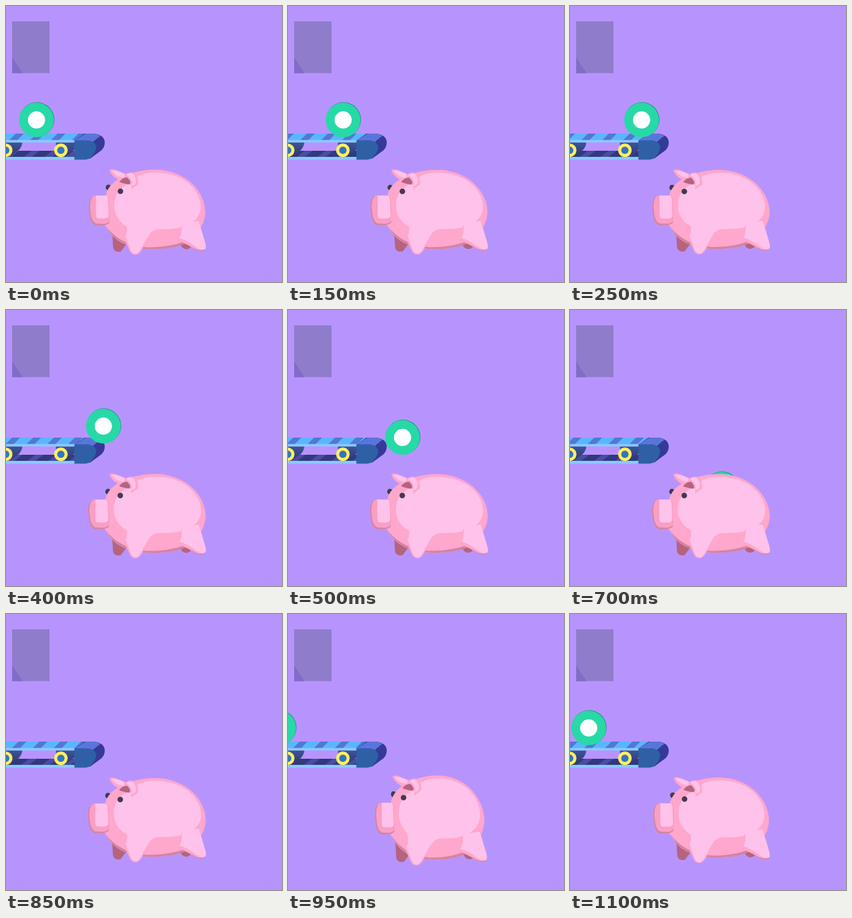
Write an HTML page that moves like this. It is 450 px wide and 450 px high and loops after 1150 ms.

```html
<!DOCTYPE html>
<html lang="en">
<head>
<meta charset="utf-8">
<title>Piggy bank</title>
<style>
  html, body { margin: 0; width: 100%; height: 100%; overflow: hidden; background: #b794fd; }
  svg { display: block; width: 100vw; height: 100vh; }
  .light { fill: #ffc2ea; }
  .mid { fill: #ffa7cd; }
  .shade { fill: #d6839f; }
  .dark { fill: #b5647f; }
  .eye { fill: #423b4c; }
</style>
</head>
<body>
<svg viewBox="0 0 450 450">
  <defs>
    <clipPath id="topFace"><path d="M0 208H134L112 219H0z"/></clipPath>
    <clipPath id="lowFace"><path d="M0 236H112V246H0z"/></clipPath>
    <linearGradient id="tube" x1="0" y1="0" x2="0" y2="1">
      <stop offset="0" stop-color="#3d5596"/>
      <stop offset="1" stop-color="#2f3878"/>
    </linearGradient>
    <g id="roller">
      <path d="M-8 -13H27Q27 -7 22 -1L8 9H-8z" fill="url(#tube)"/>
      <circle r="11" fill="#fff05e"/>
      <circle r="6" fill="#3574bd"/>
    </g>
  </defs>

  <rect width="450" height="450" fill="#b794fd"/>
  <rect x="10" y="25" width="61" height="84.500" fill="#8f7ccb"/>
  <path d="M10 84L27 109.500H10z" fill="#816cc8"/>

  <g id="belt">
    <g clip-path="url(#lowFace)">
      <rect y="236" width="112" height="10" fill="#303a7c"/>
      <g id="lowStripes" fill="#4a4da0"></g>
    </g>
    <g clip-path="url(#topFace)">
      <rect y="208" width="140" height="11" fill="#5bb5fd"/>
      <g id="topStripes" fill="#5377d5"></g>
    </g>
    <path d="M128 208H144Q160 210 161 222Q161 230 156 235L137 249L112 219z" fill="#343a97"/>
    <path d="M130 208H144Q150 209 154 211.500L141 222Q136 219 130 219H112z" fill="#5a75d9"/>
    <use href="#roller" x="-.5" y="235.200"/>
    <use href="#roller" x="89.500" y="235.200"/>
    <path d="M0 218.500H112V222.500H0zM0 246H112V250.500H0z" fill="#8ac9ff"/>
    <path d="M111.500 219H132Q147 220 147 231Q146 240 136 249L130 250.500H111.500z" fill="#2f60a6"/>
  </g>

  <g id="coin">
    <circle cx=".7" cy="-.6" r="28.400" fill="#238f87"/>
    <circle r="28.300" fill="#27d9a6"/>
    <circle r="14" fill="#fff"/>
  </g>

  <g id="farLegs" class="dark">
    <path d="M173 368L174.500 394Q177 402 187 400L199 384V368z"/>
    <path d="M276 378L288 394Q295 398.500 301 393L300 376z"/>
  </g>

  <g id="torso">
    <circle class="eye" cx="166.500" cy="296" r="4.500"/>
    <path class="mid" d="M161 318C161 299 173 287 188 280C205 271 228 266 250 267.500C296 271 326 304 325.500 338C324 355 314 370 302 381C285 393 258 397 230 396C204 394 184 387 172 373L160 356z"/>
    <path class="shade" d="M160 354C173 376 196 390 230 393C258 393 284 389 302 378V381C288 393 258 397 230 396C204 394 184 387 172 373z"/>
    <path class="light" d="M176 324C177 304 189 292 209 287C210 276 228 271 249 272C292 274 318 301 318 328C317 344 308 353 290 359C274 365 258 363 246 364Q238 365 232 374L197 360C184 352 175 339 176 324z"/>
    <path class="shade" d="M144 309H162Q166 309.500 167 315L168 353Q164 357 158 357L145 357.500Q138 354 136 344Q133 326 135 318Q138 310 144 309z"/>
    <path fill="#f89fc3" d="M144 309H162Q166 309.500 167 315L168 351Q164 355 158 355L146 354.500Q140 352 138 343Q135 326 137 318Q139 310 144 309z"/>
    <path class="light" d="M146 309H162Q165 309 166 315L167 342Q166 346 161 346.500H150Q146 346 146 341z"/>
  </g>

  <g id="face">
    <path class="mid" d="M168.300 268Q172 265.500 179 267.500L197 275L189 285Q174 282 168.300 268z"/>
    <path class="light" d="M172 268.500Q182 268 195 275L191 280Q179 279 172 268.500z"/>
    <path class="dark" d="M184.500 287Q191 278 204 280L202 291Q194 291 184.500 287z"/>
    <path class="mid" d="M192 276Q202 269 210 273Q217 282 215 291L204 299Q206 284 192 276z"/>
    <path class="light" d="M196 275.500Q203 271 208 275Q213 282 211 290L205 294Q207 282 196 275.500z"/>
    <circle class="eye" cx="186.400" cy="302.400" r="4.500"/>
  </g>

  <g id="nearLegs">
    <path class="mid" d="M192 356L189 371L201 397Q204 405 211 405Q217 404.500 221 398L230 381z"/>
    <path class="light" d="M195 350Q200 364 195 375L204 399Q207 404 213 403.500Q217 402 221 394L237 366L232 351z"/>
    <path class="shade" d="M281 381L296 387L309 397Q319 401 325 397L312 376z"/>
    <path class="mid" d="M287 354Q282 366 284 375Q280 379 284 383L310 396Q318 399 325 396Q327 394 325 386L315 351z"/>
    <path class="light" d="M286 354Q288 367 283 378Q295 381 309 392Q318 398 324 396Q327 394 325 386L314 350z"/>
  </g>
</svg>

<script>
  const LOOP = 1150, STEP = 50, PERIOD = 34;
  const $ = id => document.getElementById(id);
  const place = (id, value) => $(id).setAttribute("transform", value);

  // Linear interpolation through [time, value] pairs.
  function track(points, t) {
    const i = Math.max(1, points.findIndex(p => p[0] >= t));
    const [t0, a] = points[i - 1], [t1, b] = points[i];
    return a + (b - a) * (t - t0) / (t1 - t0);
  }

  function addStripes(id, y, height, slant) {
    let d = "";
    for (let x = -2 * PERIOD; x < 150; x += PERIOD)
      d += `M${x} ${y + height}l${slant} ${-height}h13l${-slant} ${height}z`;
    $(id).innerHTML = `<path d="${d}"/>`;
  }
  addStripes("topStripes", 208, 11, 11);
  addStripes("lowStripes", 236, 10, 13);

  const coinX = [[0, 49.7], [250, 116.7], [500, 186.7], [700, 247], [800, 277]];
  const coinIn = [[850, -45], [950, -15.3], [1100, 30.5], [1150, 49.7]];
  // Positive values stretch the pig upwards, negative ones flatten it.
  const wobble = [[0, .1], [250, 0], [500, -.05], [850, -.05], [900, -.6],
                  [950, 1], [1000, -.5], [1050, .3], [1150, .1]];
  const DROP = 333, GRAVITY = .00079;

  function draw(t) {
    const entering = t >= 850;
    const fall = entering ? 0 : GRAVITY * Math.max(0, t - DROP) ** 2;
    place("coin", `translate(${track(entering ? coinIn : coinX, t)} ${185.8 + fall})`);
    $("coin").style.display = t > 750 && !entering ? "none" : "";

    const shift = (t / LOOP * 11 * PERIOD + 5) % PERIOD;
    place("topStripes", `translate(${shift})`);
    place("lowStripes", `translate(${-shift})`);

    const k = track(wobble, t);
    place("torso", `translate(248 327.6) scale(${1 - .068 * k} ${1 + .066 * k}) translate(-248 -327.6)`);
    place("face", `translate(${2 * k} ${-3 * k})`);
    place("nearLegs", `translate(${-1.5 * k} ${5 * k})`);
    place("farLegs", `translate(${2 * k} ${4 * k})`);
  }

  const start = performance.now();
  function tick() {
    const t = (performance.now() - start) % LOOP;
    draw(Math.floor(t / STEP) * STEP);
    requestAnimationFrame(tick);
  }
  tick();
</script>
</body>
</html>
```
